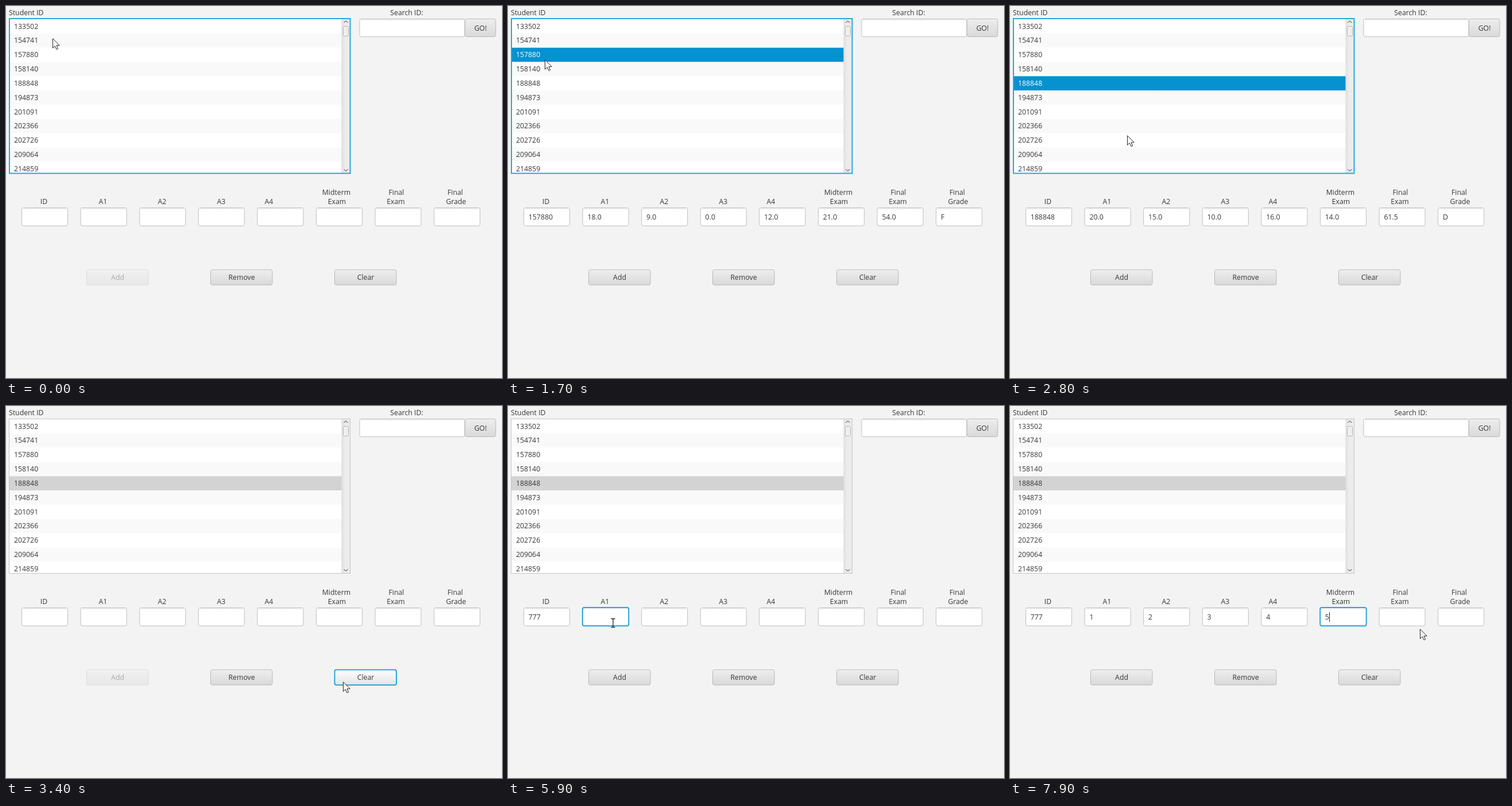
Recreate the animation shown at these times as an HTML page. Size 864 px wide and 648 px high, loop 8000 ms.

```html
<!DOCTYPE html>
<html lang="en">
<head>
<meta charset="utf-8">
<title>Student grades</title>
<style>
  html, body { margin: 0; width: 100%; height: 100%; overflow: hidden; background: #f3f3f3; }
  svg { display: block; width: 864px; height: 648px; }
  text { font: 12.3px "Open Sans", "Noto Sans", sans-serif; fill: #383838; white-space: pre; }
  .mid { text-anchor: middle; }
  .frame { fill: #fff; stroke: #c4c4c4; }
  .field { fill: #fff; stroke: #bfbfbf; }
  .ring { fill: none; stroke: #27a7dc; stroke-width: 2; }
  .button rect { fill: url(#face); stroke: #b9b9b9; }
  .button.hover rect { fill: url(#faceHover); }
  .button.off { opacity: .4; }
  .arrow { fill: none; stroke: #777; stroke-width: 1.3; }
</style>
</head>
<body>
<svg id="stage" viewBox="0 0 864 648">
  <defs>
    <linearGradient id="face" x2="0" y2="1">
      <stop offset="0" stop-color="#fafafa"/><stop offset=".07" stop-color="#ececec"/>
      <stop offset="1" stop-color="#d9d9d9"/>
    </linearGradient>
    <linearGradient id="faceHover" x2="0" y2="1">
      <stop offset="0" stop-color="#fff"/><stop offset="1" stop-color="#e3e3e3"/>
    </linearGradient>
    <linearGradient id="track">
      <stop offset="0" stop-color="#dedede"/><stop offset=".4" stop-color="#ececec"/>
      <stop offset="1" stop-color="#ececec"/>
    </linearGradient>
    <linearGradient id="inset" x2="0" y2="1">
      <stop offset="0" stop-color="#e6e6e6"/><stop offset="1" stop-color="#fff"/>
    </linearGradient>
    <clipPath id="listClip"><rect x="6" y="23" width="579" height="268"/></clipPath>
  </defs>
</svg>
<script>
const LOOP = 8000, STEP = 100;
const ROW_TOP = 23, ROW_H = 24.83;
const FIELD_Y = 351, FIELD_W = 81, FIELD_H = 32.5;
const stage = document.getElementById('stage');

const ids = [133502, 154741, 157880, 158140, 188848, 194873,
             201091, 202366, 202726, 209064, 214859];

// Values shown when a row is picked, after its ID
const records = {
  1: ['5.0', '0.0', '5.0', '17.0', '17.0', '69.5', 'D'],
  2: ['18.0', '9.0', '0.0', '12.0', '21.0', '54.0', 'F'],
  3: ['25.0', '11.0', '0.0', '0.0', '12.0', '0.0', 'F'],
  4: ['20.0', '15.0', '10.0', '16.0', '14.0', '61.5', 'D']
};

const events = [
  { t: 500, row: 1 }, { t: 1500, row: 2 }, { t: 2000, row: 3 }, { t: 2500, row: 4 },
  { t: 3300, clear: true },
  { t: 4300, focus: 0 }, { t: 4600, key: '7' }, { t: 4800, key: '7' }, { t: 5000, key: '7' },
  { t: 5400, focus: 1 }, { t: 6100, key: '1' },
  { t: 6400, focus: 2 }, { t: 6600, key: '2' },
  { t: 6800, focus: 3 }, { t: 6900, key: '3' },
  { t: 7100, focus: 4 }, { t: 7300, key: '4' },
  { t: 7500, focus: 5 }, { t: 7700, key: '5' }
];

// Pointer path: time, x, y
const path = [
  [0, 81, 56], [400, 62, 59], [1100, 61, 65], [1400, 62, 85], [1600, 63, 88],
  [1900, 67, 108], [2100, 68, 112], [2300, 69, 134], [2600, 70, 136],
  [3200, 587, 480], [3600, 587, 480], [4200, 75, 370], [5100, 75, 369],
  [5400, 183, 378], [6100, 183, 378], [6400, 280, 372], [6600, 280, 372],
  [6800, 384, 374], [6900, 384, 374], [7100, 484, 374], [7250, 484, 374],
  [7500, 588, 374], [7700, 590, 374], [7900, 714, 388]
];

function add(tag, attrs, parent = stage, text) {
  const el = document.createElementNS('http://www.w3.org/2000/svg', tag);
  for (const k in attrs) el.setAttribute(k, attrs[k]);
  if (text !== undefined) el.textContent = text;
  return parent.appendChild(el);
}
const label = (x, y, s, parent) => add('text', { x, y, class: 'mid' }, parent, s);
const show = (el, on) => el.setAttribute('visibility', on ? 'visible' : 'hidden');
const box = (x, y, width, height, more) => ({ x, y, width, height, ...more });
const fieldX = i => 27 + 102.6 * i;

function field(x, y, w, h) {
  add('rect', box(x + .5, y + .5, w - 1, h - 1, { rx: 3, class: 'field' }));
  add('rect', box(x + 1.5, y + 1, w - 3, 3, { fill: 'url(#inset)' }));
}

function button(x, y, w, h, s) {
  const g = add('g', { class: 'button' });
  add('rect', box(x + .5, y + .5, w - 1, h - 1, { rx: 3 }), g);
  label(x + w / 2 + .3, y + h / 2 + 4.5, s, g);
  return { g, x, y, w, h };
}

// Student list
add('text', { x: 5, y: 16 }, stage, 'Student ID');
add('rect', box(5.5, 22.5, 594, 269, { class: 'frame' }));
const list = add('g', { 'clip-path': 'url(#listClip)' });
const rows = ids.map((id, i) => {
  const y = ROW_TOP + ROW_H * i;
  return {
    bar: add('rect', box(6, y, 579, ROW_H), list),
    text: add('text', { x: 14, y: y + 16.6 }, list, id)
  };
});
add('rect', box(584.5, 23, 14.5, 268, { fill: 'url(#track)' }));
add('rect', box(587.5, 35.5, 9, 17, { rx: 2, fill: '#efefef', stroke: '#b5b5b5' }));
add('path', { d: 'M588.5 29l3.5-3 3.5 3M588.5 284.5l3.5 3 3.5-3', class: 'arrow' });
const listRing = add('rect', box(6, 22, 593.5, 269.5, { class: 'ring' }));

// Search
label(698, 16, 'Search ID:');
field(615.5, 22, 184, 32);
const buttons = [button(799, 22, 54.5, 32, 'GO!')];

// Entry fields
[[66, 345, 'ID'], [169, 345, 'A1'], [272, 345, 'A2'], [375, 345, 'A3'], [458, 345, 'A4'],
 [575.5, 329, 'Midterm'], [576.5, 345, 'Exam'], [680, 329, 'Final'], [679, 345, 'Exam'],
 [782.5, 329, 'Final'], [784, 345, 'Grade']].forEach(a => label(...a));
const values = Array.from({ length: 8 }, (_, i) => {
  field(fieldX(i), FIELD_Y, FIELD_W, FIELD_H);
  return add('text', { x: fieldX(i) + 8.8, y: 372 });
});
const fieldRing = add('rect', box(0, FIELD_Y, FIELD_W - .5, FIELD_H - .5, { rx: 3, class: 'ring' }));
const caret = add('rect', box(0, 359, 1, 17, { fill: '#222' }));

// Buttons
const [addBtn, , clearBtn] = ['Add', 'Remove', 'Clear'].map((s, i) => {
  const b = button(140 + 216 * i, 459, 108.5, 27.5, s);
  buttons.push(b);
  return b;
});
const clearRing = add('rect', box(572.5, 459.5, 107.5, 26.5, { rx: 3, class: 'ring' }));

// Pointers
const arrow = add('path', {
  d: 'M.5.8V17.2L4.3 13.7 7 19.6 9.6 18.5 7 12.7H12.2Z',
  fill: '#fff', stroke: '#222', 'stroke-linejoin': 'round'
});
const beam = add('path', {
  d: 'M-3.5-7.5H-1L0-6.5 1-7.5H3.5M0-6.5V6.5M-3.5 7.5H-1L0 6.5 1 7.5H3.5',
  fill: 'none', stroke: '#222', 'stroke-width': 1.3
});

function stateAt(t) {
  const s = { row: -1, text: Array(8).fill(''), focus: 'list', since: 0 };
  for (const e of events) {
    if (e.t > t) break;
    s.since = e.t;
    if (e.row !== undefined) {
      s.row = e.row;
      s.text = [ids[e.row], ...records[e.row]];
    } else if (e.clear) {
      s.text = Array(8).fill('');
      s.focus = 'clear';
    } else if (e.focus !== undefined) {
      s.focus = e.focus;
    } else {
      s.text[s.focus] += e.key;
    }
  }
  return s;
}

function pointerAt(t) {
  const i = path.findIndex(p => p[0] > t);
  if (i < 0) return path[path.length - 1].slice(1);
  const [t0, x0, y0] = path[i - 1], [t1, x1, y1] = path[i];
  const u = (t - t0) / (t1 - t0), k = u * u * (3 - 2 * u);
  return [Math.round(x0 + (x1 - x0) * k), Math.round(y0 + (y1 - y0) * k)];
}

const inside = (px, py, x, y, w, h) => px >= x && px <= x + w && py >= y && py <= y + h;

function draw(t) {
  const s = stateAt(t), [px, py] = pointerAt(t);
  const listFocus = s.focus === 'list', typing = typeof s.focus === 'number';

  rows.forEach(({ bar, text }, i) => {
    const picked = i === s.row;
    bar.style.fill = picked ? (listFocus ? '#0691d0' : '#d3d3d3') : i % 2 ? '#f9f9f9' : '#fff';
    text.style.fill = picked && listFocus ? '#fff' : '';
  });
  values.forEach((el, i) => { el.textContent = s.text[i]; });

  show(listRing, listFocus);
  show(clearRing, s.focus === 'clear');
  show(fieldRing, typing);
  show(caret, typing && (t - s.since) % 1000 < 500);
  if (typing) {
    fieldRing.setAttribute('x', fieldX(s.focus) + .2);
    const end = s.text[s.focus] ? values[s.focus].getComputedTextLength() : 0;
    caret.setAttribute('x', Math.round(fieldX(s.focus) + 8.5 + end));
  }

  addBtn.g.classList.toggle('off', !s.text[0]);
  for (const b of buttons) b.g.classList.toggle('hover', inside(px, py, b.x, b.y, b.w, b.h));

  const overField = values.some((_, i) => inside(px, py, fieldX(i), FIELD_Y, FIELD_W, FIELD_H));
  show(arrow, !overField);
  show(beam, overField);
  (overField ? beam : arrow).setAttribute('transform', `translate(${px} ${py})`);
}

function tick() {
  const t = performance.now() % LOOP;
  draw(Math.floor(t / STEP) * STEP);
  requestAnimationFrame(tick);
}
tick();
</script>
</body>
</html>
```
